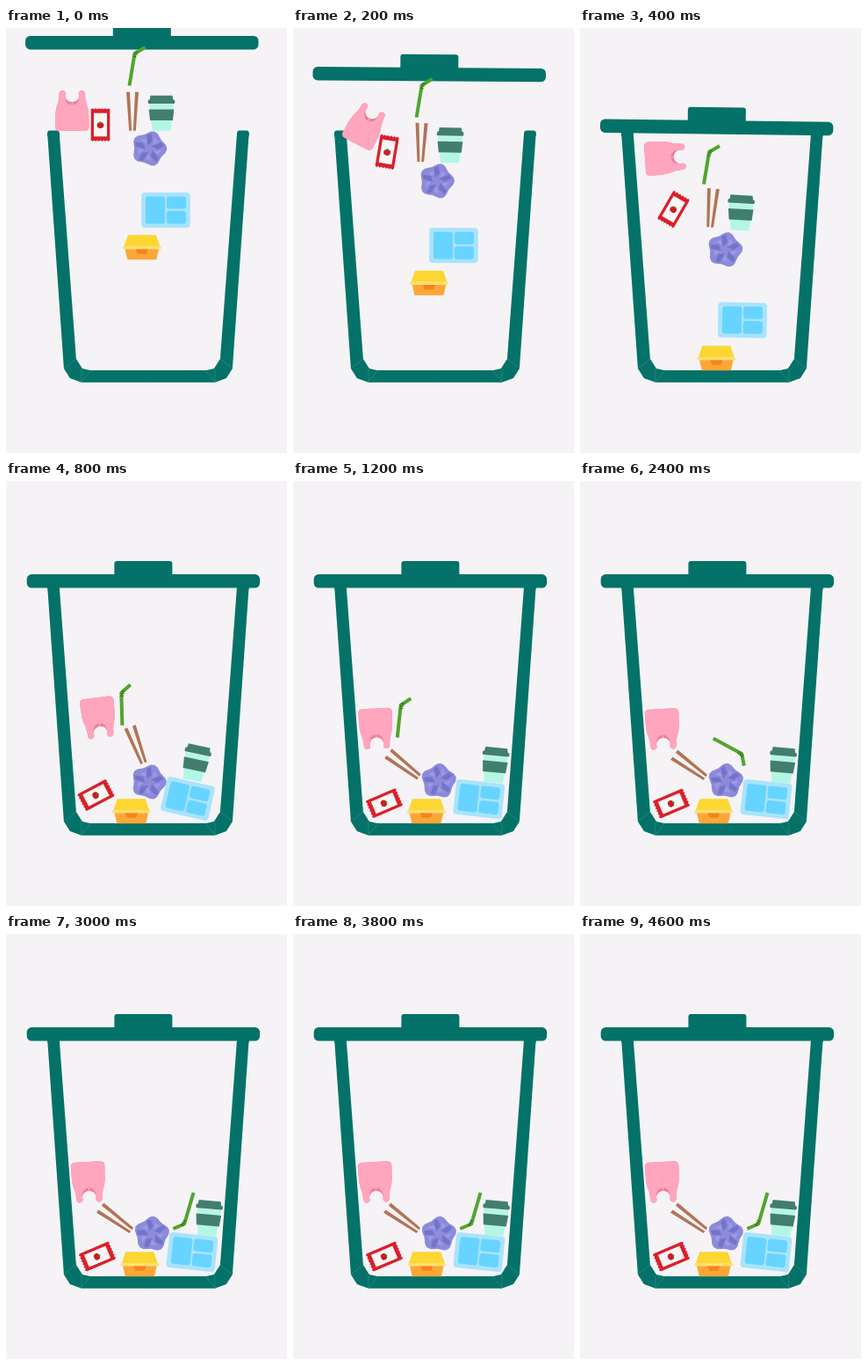
An HTML page with a canvas that plays this animation: 320x483 px, repeating every 4.7 s.

```html
<!DOCTYPE html>
<html lang="en">
<head>
<meta charset="utf-8">
<title>Bin</title>
<style>
html, body { margin: 0; width: 100%; height: 100%; overflow: hidden; background: #f5f3f6; }
canvas { display: block; width: 320px; height: 483px; }
</style>
</head>
<body>
<canvas id="stage"></canvas>
<script>
const W = 320, H = 483, LOOP = 4700, STEP = 100;
const TEAL = '#047268';
const canvas = document.getElementById('stage');
const ctx = canvas.getContext('2d');
const dpr = window.devicePixelRatio || 1;
canvas.width = W * dpr;
canvas.height = H * dpr;

const clamp = u => Math.min(1, Math.max(0, u));
const easeOut = u => 1 - (1 - clamp(u)) ** 2;
const mix = (a, b, u) => a.map((v, i) => v + (b[i] - v) * u);

function poly(color, ...p) {
  ctx.beginPath();
  for (let i = 0; i < p.length; i += 2) ctx.lineTo(p[i], p[i + 1]);
  ctx.closePath();
  ctx.fillStyle = color;
  ctx.fill();
}

// Upright symmetric trapezoid around x = 0
function taper(color, top, topHalf, bottom, bottomHalf) {
  poly(color, -topHalf, top, topHalf, top, bottomHalf, bottom, -bottomHalf, bottom);
}

function box(color, x, y, w, h, r = 0) {
  ctx.beginPath();
  ctx.roundRect(x, y, w, h, r);
  ctx.fillStyle = color;
  ctx.fill();
}

function line(color, width, ...p) {
  ctx.beginPath();
  for (let i = 0; i < p.length; i += 2) ctx.lineTo(p[i], p[i + 1]);
  ctx.strokeStyle = color;
  ctx.lineWidth = width;
  ctx.lineJoin = 'round';
  ctx.stroke();
}

function mirrored(draw) {
  for (const side of [1, -1]) {
    ctx.save();
    ctx.scale(side, 1);
    draw();
    ctx.restore();
  }
}

function bin() {
  mirrored(() => {
    box(TEAL, -114.8, 116.5, 13.6, 8, 3);
    poly(TEAL, -114.8, 119, -101.2, 119, -82, 376, -75, 387, -66, 389, 0.3, 389,
      0.3, 402.7, -76, 402.7, -89, 398, -96, 387);
    line('rgba(120,180,172,.4)', 0.7, -96, 387, -82, 376);
    line('rgba(120,180,172,.4)', 0.7, -76, 388, -76, 402, -66, 390);
  });
}

function lid() {
  box(TEAL, -33, -22.7, 66, 20, [3, 3, 0, 0]);
  box(TEAL, -132.7, -7.7, 265.4, 15.4, 5.5);
}

function bagLayer(color, depth) {
  ctx.fillStyle = color;
  mirrored(() => {
    ctx.beginPath();
    ctx.moveTo(0.2, 23);
    ctx.lineTo(0.2, depth);
    ctx.bezierCurveTo(6, depth, 9, depth - 6, 7.5, -19);
    ctx.quadraticCurveTo(7.5, -23, 11, -23);
    ctx.quadraticCurveTo(14.8, -23, 14.8, -18);
    ctx.bezierCurveTo(14.8, -9, 18.5, -6, 18.8, 4);
    ctx.lineTo(19.3, 18);
    ctx.quadraticCurveTo(19.3, 23, 14, 23);
    ctx.fill();
  });
}

function bag() {
  bagLayer('#ee7f9c', -10);
  bagLayer('#ffa5bd', -6.5);
}

function sachet() {
  const red = '#d9202b';
  box(red, -10.8, -17.8, 21.6, 35.6);
  for (let x = -9; x < 10; x += 3.6) {
    for (const y of [-17.5, 17.5]) box(red, x - 1, y - 1.3, 2, 2.6, 1);
  }
  box('#fbf5f4', -7.5, -13.3, 15, 26.6);
  ctx.beginPath();
  ctx.ellipse(0, 0.6, 3.9, 3.4, 0, 0, 7);
  ctx.fillStyle = '#c81e22';
  ctx.fill();
  poly('#3c8a2e', -2, -2.4, 0, -3.8, 2, -2.4, 0, -1.2);
}

function sticks() {
  mirrored(() => poly('#b17456', 3, -22, 7, -22, 3.8, 22, 0.9, 22));
}

function cup() {
  const green = '#427e6e';
  taper('#b4f6e5', -10, 14, 20, 10.5);
  taper(green, -20, 12.5, -14.5, 13.5);
  box(green, -15.3, -15.3, 30.6, 4.6, 1.5);
  taper(green, -4.3, 14.3, 8.3, 13);
}

function paper() {
  ctx.beginPath();
  for (let a = 0; a < 6.28; a += 0.21) {
    const r = 18.6 + 1.8 * Math.cos(5 * a);
    ctx.lineTo(r * Math.cos(a), r * Math.sin(a));
  }
  ctx.fillStyle = '#8d8bd9';
  ctx.fill();
  // Creases turn around the middle
  for (let i = 0; i < 5; i++) {
    ctx.save();
    ctx.rotate(i * Math.PI * 0.4);
    poly('#7473cb', 3, -3, 14, -7, 17, -3, 9, 1);
    poly('#9c9be4', 5, 3, 14, 2, 10, 7);
    ctx.restore();
  }
}

function tray() {
  const cell = '#67d4ff';
  box('#a9e3fc', -27.8, -20, 55.6, 40, 4);
  box(cell, -23, -15.5, 22, 31, 3);
  box(cell, 1, -15.5, 22, 14, 3);
  box(cell, 1, 1, 22, 14.5, 3);
}

function lunchBox() {
  taper('#fca636', 1, 19.5, 14, 16.5);
  taper('#fdd631', -14, 16, -1, 20.5);
  box('#fee074', -22, -1.2, 44, 3.4, 1.6);
  taper('#f5831c', 2.2, 7, 7.5, 5);
}

function straw() {
  line('#51a52d', 4, 15, -25, 3, -18, -3, 18.5);
  for (let i = 0; i < 3; i++) line('#2b701c', 1.2, 3.5 - i, -20 + i * 2.5, 7 - i, -19 + i * 2.5);
}

// Distance fallen after s seconds
const drop = s => 80 * s + 500 * s * s;

// Poses [x, y, degrees]: at the start, in the air, landed, at rest
const items = [
  [bag, [75.3, 94, 0], [97, 147.5, 86], [105.5, 269, 173], [94, 282, 177]],
  [sachet, [107.5, 110, 0], [106.5, 206, 30], [102.5, 357, 62], [104, 366.5, 67]],
  [sticks, [144, 94.7, 0], [150, 204.5, 5], [149, 300, -21], [125, 324, -54]],
  [cup, [177, 96.8, 0], [183, 210, 3], [216, 320.5, 12], [230.5, 323, 5]],
  [paper, [163, 137, 0], [165, 252, -5], [162.5, 342, 0], [166, 341, -13]],
  [tray, [182, 207, 0], [185, 332, 1], [207, 361, 13], [212, 361.5, 6]],
  [lunchBox, [154.8, 249.3, 0], [155.3, 375.3, 0], [142.8, 375.3, 0], [152.3, 375.3, 0]],
  [straw, [143.5, 47, 0], [144, 159, 0], [131.8, 259, -11], [120.3, 273.5, -3]]
];

function pose([start, air, landed, rest], t) {
  const s = t / 1000;
  if (s < 0.4) return mix(start, air, drop(s) / drop(0.4));
  if (s > 0.8) return mix(landed, rest, easeOut((s - 0.8) / 0.5));
  const p = mix(air, landed, easeOut((s - 0.4) / 0.4));
  p[1] = Math.min(landed[1], air[1] + drop(s) - drop(0.4));
  return p;
}

function lidPose(t) {
  const q = clamp((t - 367) / 380);
  const tilt = t < 367 ? 0.8 * t / 367 : 0.8 * (1 - q);
  const y = Math.min(113.8, 16.7 + drop(t / 1000)) - 3.5 * Math.sin(Math.PI * q);
  return [154.8 + 1.6 * clamp(t / 750), y, tilt];
}

// The straw tips over the paper ball and comes to rest by the cup
function topple([x, y, deg], t) {
  const u = clamp((t - 1600) / 1200);
  return [x + 88 * u ** 1.5, y + 38.5 * u ** 0.8, deg + 190 * u ** 1.3];
}

function place(shape, [x, y, deg]) {
  ctx.save();
  ctx.translate(x, y);
  ctx.rotate(deg * Math.PI / 180);
  shape();
  ctx.restore();
}

function draw(t) {
  ctx.setTransform(dpr, 0, 0, dpr, 0, 0);
  ctx.fillStyle = '#f5f3f6';
  ctx.fillRect(0, 0, W, H);
  place(bin, [161.9, 0, 0]);
  place(lid, lidPose(t));
  for (const [shape, ...poses] of items) {
    const p = pose(poses, t);
    place(shape, shape === straw ? topple(p, t) : p);
  }
}

const begin = performance.now();
function tick() {
  const t = (performance.now() - begin) % LOOP;
  draw(Math.floor(t / STEP) * STEP);
  requestAnimationFrame(tick);
}
tick();
</script>
</body>
</html>
```
